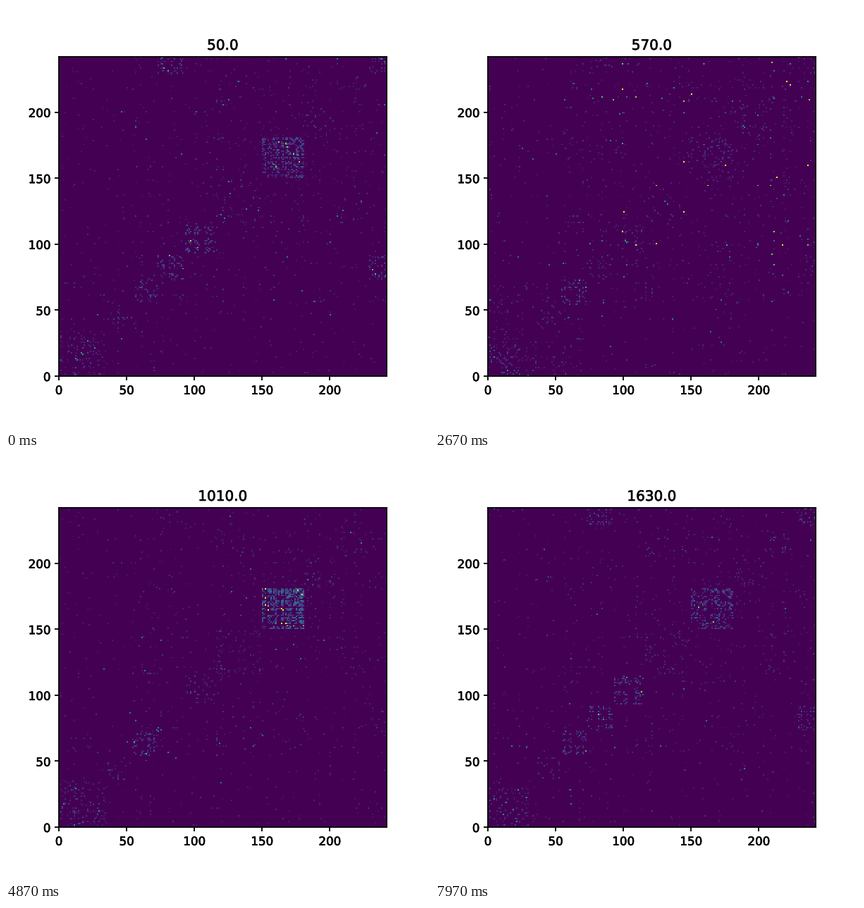
A matplotlib script for the animation above (8000 ms loop, 600 px wide and 600 px high).

```python
import numpy as np
import matplotlib.pyplot as plt
from matplotlib import patheffects
from matplotlib.animation import FuncAnimation

N = 242        # people in the contact matrix
STEPS = 80     # time windows in one loop
HOLD = 6       # windows a contact lasts

rng = np.random.default_rng(12)

# Upper case: school classes in matrix order, then L (first lunch table) and
# W (the later classes). Lower case: single people who link to a class.
EDGES = [0, 36, 54, 73, 93, 116, 150, 181, 204, 228, N]
GROUPS = {name: np.arange(lo, hi)
          for name, lo, hi in zip("ABCDEFGHIJ", EDGES, EDGES[1:])}
GROUPS.update(
    L=np.arange(0, 70), W=np.arange(54, N), Z=np.arange(N),
    a=[61, 67, 70], b=[119, 136, 179, 189, 200], c=[109, 116, 121, 136],
    e=[146, 160, 169, 231, 235, 240], l=[116, 136, 158, 170, 203, 219],
    s=np.sort(rng.choice(np.arange(75, N), 30, replace=False)),
)


def bump(k, *centres, width=6):
    return sum(np.exp(-((k - c) / width) ** 2) for c in centres)


def strengths(k):
    """How strongly each pair of groups meets in window k."""
    lesson = bump(k, 11, 60)
    recess = bump(k, 0, 19, 79)
    quiet = bump(k, 48)
    lunch = bump(k, 33)
    mixed = bump(k, 19)
    lessons = dict(
        AA=.1 + .2 * lesson, BB=.15 + .25 * lesson, CC=.2 + .1 * lesson,
        EE=.12 + .15 * recess + .65 * lesson, FF=.06 + .06 * lesson,
        GG=.05 + .22 * recess + .4 * quiet, HH=.06 + .08 * mixed,
        II=.08 + .08 * lesson + .08 * mixed, FI=.04 + .12 * lesson,
        Aa=.05 + .2 * lesson, Bb=.05 + .25 * lesson, Cc=.06 + .1 * lesson,
        Ee=.04 + .45 * lesson, DD=.02 + .2 * recess, DJ=.02 + .17 * recess,
        JJ=.12 * recess, HI=.14 * mixed, WW=.01 + .05 * mixed,
    )
    levels = {pair: s * (1 - lunch) for pair, s in lessons.items()}
    levels.update(LL=.16 * lunch, Ll=.12 * lunch, ZZ=.012)
    return levels, lunch


def mirror(m):
    """Copy the lower triangle of each matrix to its upper one."""
    low = np.tril(m, -1)
    return low + np.swapaxes(low, -1, -2)


def pair_mask(pair):
    mask = np.zeros((N, N))
    p, q = (GROUPS[name] for name in pair)
    mask[np.ix_(p, q)] = 1
    mask[np.ix_(q, p)] = 1
    return mask


slots = STEPS // HOLD + 3
chance = mirror(rng.random((slots, N, N)))
weight = mirror(rng.random((slots, N, N)))
phase = mirror(rng.integers(0, HOLD, (N, N)))
rows, cols = np.indices((N, N))

# Sociable people make bright stripes, shy ones dark gaps.
activity = .05 + .95 * rng.random(N)
for name in "abcel":
    activity[GROUPS[name]] = 1
meet = 2.5 * np.outer(activity, activity)

MASKS = {pair: pair_mask(pair) for pair in strengths(0)[0]}
TABLES = pair_mask("ss") > 0


def contacts(k):
    slot = (k + phase) // HOLD
    luck = chance[slot, rows, cols]
    size = weight[slot, rows, cols]

    levels, lunch = strengths(k)
    dense = sum(s * MASKS[pair] for pair, s in levels.items())
    value = (.1 + .42 * dense) * (.4 + 1.1 * size ** 2)
    value[size > .97] *= 2.5
    value[luck >= np.minimum(dense * meet, .9)] = 0

    bright = TABLES & (luck < .28 * lunch)
    value[bright] = (.3 + 1.1 * size)[bright]
    np.fill_diagonal(value, 0)
    return np.clip(value, 0, 1)


plt.rcParams.update({"font.family": "DejaVu Sans", "axes.linewidth": 1.1,
                     "xtick.major.width": 1.1, "ytick.major.width": 1.1})
fig = plt.figure(figsize=(5, 5), dpi=120, facecolor="white")
ax = fig.add_axes([.125, .125, .775, .755])
image = ax.imshow(contacts(0), cmap="viridis", vmin=0, vmax=1, origin="lower",
                  extent=(0, N, 0, N), aspect="auto", interpolation="nearest")
ax.set_xticks(range(0, N, 50))
ax.set_yticks(range(0, N, 50))
title = ax.set_title("50.0", fontsize=12)
for text in [title, *ax.get_xticklabels(), *ax.get_yticklabels()]:
    text.set_path_effects([patheffects.withStroke(linewidth=.4,
                                                  foreground="black")])


def draw(k):
    image.set_data(contacts(k))
    title.set_text(f"{50 + 20 * k:.1f}")
    return image, title


anim = FuncAnimation(fig, draw, frames=STEPS, interval=100, repeat=True,
                     repeat_delay=0, blit=False)
plt.show()
```
